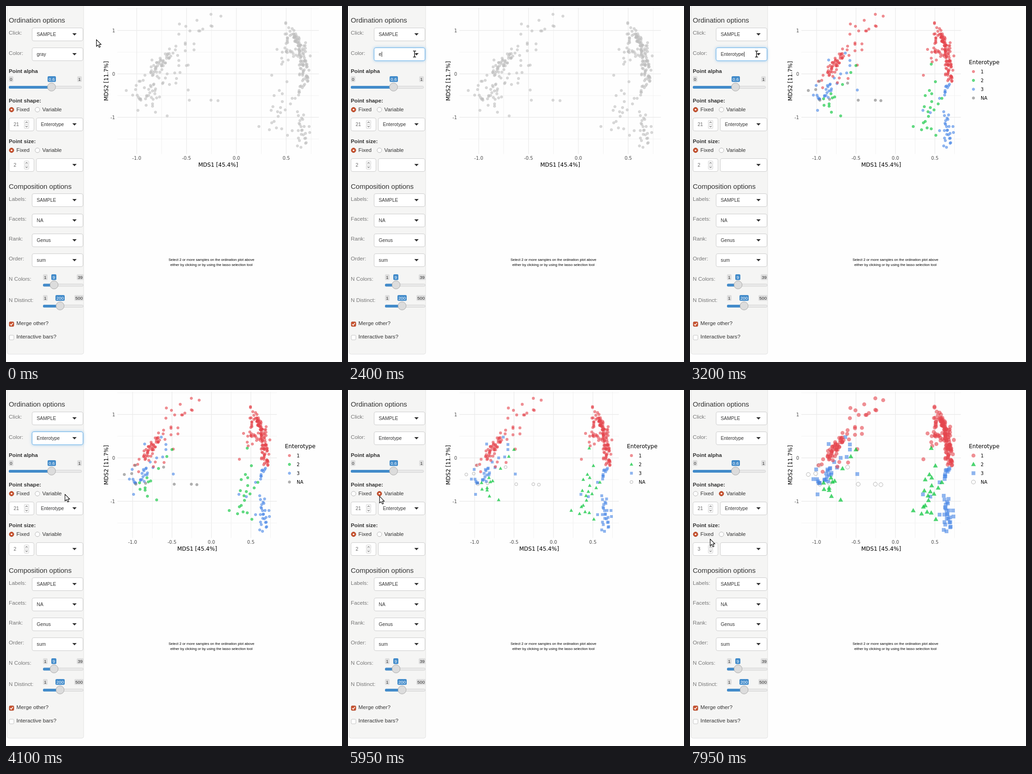
Animation, 727 px wide and 771 px high, one loop 8 s. Source, as an HTML page:

```html
<!DOCTYPE html>
<html lang="en">
<head>
<meta charset="utf-8">
<title>Ordination explorer</title>
<style>
html, body { margin: 0; width: 100%; height: 100%; overflow: hidden; background: #fefefe; }
svg { display: block; width: 100vw; height: 100vh; font-family: "Liberation Sans", Arial, sans-serif; }
.plot { font-family: "DejaVu Sans", Verdana, sans-serif; }
</style>
</head>
<body>
<svg id="stage" viewBox="0 0 727 771"></svg>
<script>
const LOOP = 8000, STEP = 50;
const stage = document.getElementById('stage');
const $ = id => document.getElementById(id);

// ---------- markup helpers ----------
const rect = (x, y, w, h, fill, more = '') =>
  `<rect x="${x}" y="${y}" width="${w}" height="${h}" fill="${fill}" ${more}/>`;
const text = (x, y, s, size = 11.7, fill = '#333', more = '') =>
  `<text x="${x}" y="${y}" font-size="${size}" fill="${fill}" ${more}>${s}</text>`;
const line = (x1, y1, x2, y2, w) =>
  `<path d="M${x1} ${y1}L${x2} ${y2}" stroke="#ebebeb" stroke-width="${w}"/>`;
const mid = 'text-anchor="middle"';
const bold = 'font-weight="bold"';

// ---------- sidebar ----------
const field = (x, y, w, id = '') =>
  rect(x + .5, y + .5, w - 1, 28, '#fff', `rx="3.5" stroke="#ccc" ${id && `id="${id}"`}`);

const select = (x, y, value, id) => field(x, y, 167 - x, id && id + 'Box') +
  text(x + 10.5, y + 18, value, 10.3, '#333', id ? `id="${id}Text"` : '') +
  `<path ${id ? `id="${id}Arrow"` : ''} d="M143.5 ${y + 12}h9.4l-4.7 5z" fill="#333"/>`;

const number = (y, value, id) => field(6, y, 55) +
  text(16.5, y + 18, value, 10.3, '#666', `id="${id}"`) +
  rect(39.5, y + 5.5, 10, 9, '#f7f7f7', 'rx="2" stroke="#ccc" stroke-width=".8"') +
  rect(39.5, y + 14.5, 10, 9, '#f7f7f7', 'rx="2" stroke="#ccc" stroke-width=".8"') +
  `<path d="M42.3 ${y + 11.2}l2.2-2.4 2.2 2.4M42.3 ${y + 17.8}l2.2 2.4 2.2-2.4" fill="none" stroke="#333"/>`;

const badge = (x, y, w, s, active) =>
  rect(x, y, w, 12.5, active ? '#428bca' : '#dedede', 'rx="2.5"') +
  text(x + w / 2, y + 9.7, s, 9.6, active ? '#fff' : '#333', mid);

const slider = (x, y, end, knob) =>
  rect(x + .5, y - 2.5, end - x - 1, 5, '#eaeaea', 'rx="2.5" stroke="#d2d2d2"') +
  rect(x, y - 3, knob - x, 6, '#428bca', 'rx="2.5"') +
  `<circle cx="${knob}" cy="${y - .5}" r="8.8" fill="#dcdcdc" stroke="#aaa"/>`;

const radio = (x, y, label, id) =>
  `<g id="${id}"><circle cx="${x}" cy="${y}" r="5"/><circle cx="${x}" cy="${y}" r="1.8" fill="#fff"/></g>` +
  text(x + 10.5, y + 3.5, label);

function setRadio(id, on) {
  const dot = $(id).firstChild;
  dot.setAttribute('fill', on ? '#c8522f' : '#fff');
  dot.setAttribute('stroke', on ? '#a84224' : '#b5b5b5');
}

const label = (y, s) => text(6, y, s, 11.7, '#777');

const sidebar = rect(2.5, -10, 165.5, 764, '#f5f5f4', 'rx="4" stroke="#e1e1e1"') +
  text(6, 36, 'Ordination options', 15) +
  label(62, 'Click:') + select(56, 47, 'SAMPLE') +
  label(106, 'Color:') + select(56, 90, 'gray', 'color') +
  text(6, 145, 'Point alpha', 11.7, '#333', bold) +
  slider(6, 176, 164, 98.5) +
  badge(6, 152, 10, '0') + badge(90, 152, 18, '0.6', true) + badge(154, 152, 10, '1') +
  text(6, 209, 'Point shape:', 11.7, '#333', bold) +
  radio(12, 224.5, 'Fixed', 'shapeFixed') + radio(68, 224.5, 'Variable', 'shapeVar') +
  number(242, '21', 'shapeNum') + select(65, 242, 'Enterotype') +
  text(6, 297, 'Point size:', 11.7, '#333', bold) +
  radio(12, 312.5, 'Fixed', 'sizeFixed') + radio(68, 312.5, 'Variable', 'sizeVar') +
  number(330, '2', 'sizeNum') + select(65, 330, '') +
  text(6, 396, 'Composition options', 15) +
  label(422, 'Labels:') + select(56, 406, 'SAMPLE') +
  label(465, 'Facets:') + select(56, 450, 'NA') +
  label(508, 'Rank:') + select(56, 493, 'Genus') +
  label(551, 'Order:') + select(56, 536, 'sum') +
  label(595, 'N Colors:') + slider(80, 604.5, 167.5, 104) +
  badge(80, 581, 10, '1') + badge(98, 581, 11, '9', true) + badge(153, 581, 15, '39') +
  label(640.5, 'N Distinct:') + slider(80, 650, 167.5, 117) +
  badge(80, 626, 10, '1') + badge(107, 626, 20, '200', true) + badge(148, 626, 20, '500') +
  rect(7, 684, 10, 10, '#c8522f', 'rx="2" stroke="#a84224" stroke-width=".8"') +
  '<path d="M9 689l2.2 2.4L15 686.5" fill="none" stroke="#fff" stroke-width="1.6"/>' +
  text(22.5, 691, 'Merge other?') +
  rect(7, 713, 10, 10, '#fff', 'rx="2" stroke="#b5b5b5" stroke-width=".8"') +
  text(22.5, 720, 'Interactive bars?');

// ---------- search results ----------
const options = [['Enterotype', 158], ['magenta', 216], ['magenta2', 237], ['magenta3', 258.5], ['darkmagenta', 280]];
const menu = '<g id="menu">' +
  rect(56.5, 121.5, 110.5, 166, '#fff', 'stroke="#d0d0d0" rx="2" style="filter:drop-shadow(0 4px 5px rgba(0,0,0,.2))"') +
  rect(57, 144, 110, 21, '#f5f5f5') + rect(57, 172, 110, 1, '#e3e3e3') +
  text(67.5, 137.5, 'Variable', 10, '#777') + text(67.5, 194, 'Fixed', 10, '#777') +
  '<g id="marks" fill="#ffed28" fill-opacity=".45"></g>' +
  options.map(([s, y]) => text(67.5, y, s, 11.6, '#333', 'class="option"')).join('') + '</g>';

// ---------- data, in pixels of the coloured panel ----------
let seed = 11;
function rand() {
  seed = (seed + 0x6D2B79F5) | 0;
  let r = Math.imul(seed ^ seed >>> 15, 1 | seed);
  r = r + Math.imul(r ^ r >>> 7, 61 | r) ^ r;
  return ((r ^ r >>> 14) >>> 0) / 4294967296;
}
const pairs = a => a.flatMap((v, i) => i % 2 ? [] : [[v, a[i + 1]]]);
// points scattered around a segment
const cloud = (n, x0, y0, x1, y1, sx, sy = 3) => Array.from({ length: n }, (_, i) => {
  const k = (i + .5) / n, soft = () => rand() + rand() + rand() - 1.5;
  return [x0 + (x1 - x0) * k + soft() * 1.6 * sx, y0 + (y1 - y0) * k + soft() * 1.6 * sy];
});

const groups = [
  { name: '3', color: '#4785e6', shape: 'square', pts: [
    ...pairs([300, 117, 346, 118, 346, 129, 339, 145, 326, 147, 312, 156, 336, 102, 273, 172, 267, 193,
      276, 226, 362, 182, 291, 194, 299, 198, 318, 168, 504, 226, 520, 231, 540, 200, 540, 270, 549, 229,
      569, 261, 570, 274, 564, 296, 555, 306, 549, 303]),
    ...cloud(11, 301, 167, 298, 195, 7), ...cloud(5, 275, 194, 283, 204, 2),
    ...cloud(9, 558, 165, 553, 191, 4), ...cloud(20, 555, 236, 560, 298, 6)] },
  { name: '1', color: '#e5454c', shape: 'circle', pts: [
    ...pairs([401, 18, 418, 22, 377, 31, 347, 39, 358, 44, 401, 43, 403, 44, 365, 54, 380, 54, 382, 54,
      387, 50, 346, 61, 357, 80, 357, 83, 372, 82, 372, 95, 357, 97, 341, 87, 340, 95, 330, 93, 344, 107,
      362, 128, 342, 157, 288, 150, 278, 163, 285, 161, 287, 177, 323, 156, 319, 166, 529, 36, 529, 38,
      534, 47, 540, 49, 543, 53, 514, 94, 505, 150, 522, 113, 524, 121, 567, 156]),
    ...cloud(44, 302, 148, 328, 108, 7, 5), ...cloud(10, 534, 54, 533, 84, 3),
    ...cloud(12, 526, 93, 541, 110, 6, 6), ...cloud(32, 543, 58, 553, 88, 3),
    ...cloud(46, 553, 84, 562, 132, 7), ...cloud(24, 557, 128, 562, 166, 5)] },
  { name: '2', color: '#00c334', shape: 'triangle', pts: pairs([
    359, 129, 348, 144, 330, 170, 326, 238, 306, 230, 301, 217, 301, 212, 289, 201, 290, 215, 305, 190,
    308, 199, 313, 197, 522, 126, 531, 164, 518, 183, 509, 194, 523, 190, 523, 207, 537, 212, 545, 200,
    507, 218, 515, 229, 520, 220, 528, 225, 516, 239, 509, 250, 505, 253, 501, 268, 513, 264, 522, 266,
    532, 280, 483, 261]) },
  { name: 'NA', color: '#7f7f7f', shape: 'ring', pts: pairs([
    256, 183, 272, 181, 341, 167, 364, 204, 401, 204, 413, 205, 280, 163, 281, 204, 302, 202]) }
];

// ---------- plot ----------
function mark(shape, x, y, r, color) {
  const fill = `fill="${color}" fill-opacity=".6"`;
  const at = `cx="${x.toFixed(1)}" cy="${y.toFixed(1)}"`;
  if (shape === 'square') return rect(x - r * .95, y - r * .95, r * 1.9, r * 1.9, color, 'fill-opacity=".6"');
  if (shape === 'triangle')
    return `<path d="M${x} ${y - r * 1.3}l${r * 1.2} ${r * 2.15}h${-r * 2.4}z" fill="${color}" fill-opacity=".7"/>`;
  if (shape === 'ring')
    return `<circle ${at} r="${r}" fill="none" stroke="${color}" stroke-opacity=".65" stroke-width=".9"/>`;
  if (shape === 'dot')
    return `<circle ${at} r="${r - .4}" ${fill} stroke="${color}" stroke-opacity=".45" stroke-width=".9"/>`;
  return `<circle ${at} r="${r}" ${fill}/>`;
}

function drawPlot(colored, shaped, size) {
  const zero = colored ? 444.5 : 498.5, unit = colored ? 170.6 : 215.7, right = colored ? 586 : 677;
  const r = 3.2 + (size - 2) * 1.1;
  let out = '';
  for (const y of [6, 100, 194, 288]) out += line(241, y, right, y, .7);
  for (const v of [-.75, -.25, .25, .75]) out += line(zero + v * unit, 4, zero + v * unit, 320.5, .7);
  for (const v of [1, 0, -1]) {
    const y = 147 - v * 94;
    out += line(241, y, right, y, 1.3) + text(236, y + 3.8, v, 10, '#4d4d4d', 'text-anchor="end"');
  }
  for (const v of [-1, -.5, 0, .5]) {
    const x = zero + v * unit;
    out += line(x, 4, x, 320.5, 1.3) + text(x, 333, v.toFixed(1), 10, '#4d4d4d', mid);
  }
  out += text((241 + right) / 2, 347.5, 'MDS1 [45.4%]', 12, '#000', mid) +
    text(0, 0, 'MDS2 [11.7%]', 12, '#000', mid + ' transform="translate(221 162.5) rotate(-90)"');
  for (const g of groups)
    for (const [x, y] of g.pts)
      out += mark(shaped ? g.shape : 'dot', zero + (x - 444.5) / 170.6 * unit, y, r, colored ? g.color : '#bebebe');
  if (colored) {
    out += text(603.5, 125.5, 'Enterotype', 12, '#000');
    ['1', '2', '3', 'NA'].forEach((name, i) => {
      const g = groups.find(g => g.name === name), y = 142 + i * 19.1;
      out += mark(shaped ? g.shape : 'dot', 613.3, y, r, g.color) + text(629, y + 3.8, name, 10, '#000');
    });
  }
  $('plot').innerHTML = out;
}

// ---------- pointer ----------
const outline = 'fill="#fff" stroke="#111" stroke-width="1.2" stroke-linejoin="round"';
const pointers = {
  arrow: `<path d="M.6 .8V15.5L4 12.4L6.5 17.6L9 16.5L6.6 11.4H11Z" ${outline}/>`,
  hand: `<path d="M-1.4 8V1.3a1.4 1.4 0 0 1 2.8 0V5.6c.3-1 2.3-1 2.5 .3c.5-.8 2.2-.7 2.4 .5c.6-.7 2.2-.4 2.2 .9V10.5c0 1.8-1.2 2-1.2 3.2H.2c-.8-1.9-4-4.2-4.3-5.6c0-1.6 1.7-1.3 2.7 0z" ${outline}/>`,
  beam: ['#fff" stroke-width="3.4', '#111" stroke-width="1.5'].map(s =>
    `<path d="M-3.2-6.5h2.4L0-6l.8-.5h2.4M0-6V6M-3.2 6.5h2.4L0 6l.8 .5h2.4" fill="none" stroke="${s}"/>`).join('')
};
// time, x, y
const route = [
  [200, 195, 72], [1050, 141, 106], [1150, 141, 106], [1200, 144, 109], [2000, 144, 109], [2050, 144, 104],
  [3900, 144, 104], [4000, 148, 165], [4100, 127, 225], [4300, 115, 256],
  [4450, 115, 256], [4900, 68, 228], [5900, 68, 228], [6650, 43, 337], [7850, 43, 337], [7950, 43, 322]
];
function pointerAt(t) {
  const i = route.findIndex(p => p[0] > t);
  if (i < 0) return route[route.length - 1].slice(1);
  if (i === 0) return route[0].slice(1);
  const [t0, x0, y0] = route[i - 1], [t1, x1, y1] = route[i];
  let k = (t - t0) / (t1 - t0);
  if (t1 - t0 > 300) k = k * k * (3 - 2 * k);
  return [x0 + (x1 - x0) * k, y0 + (y1 - y0) * k];
}
function pointerKind(t, x, y) {
  if (t >= 1200 && t < 3950) return 'beam';
  const overColor = t < 1200 && x < 167 && y > 90, overShape = x > 65 && y > 242 && y < 270;
  return overColor || overShape ? 'hand' : 'arrow';
}

// ---------- scene ----------
stage.innerHTML = '<g id="plot" class="plot"></g>' +
  text(444.5, 552, 'Select 2 or more samples on the ordination plot above', 7.75, '#000', mid) +
  text(444.5, 563, 'either by clicking or by using the lasso selection tool', 7.75, '#000', mid) +
  sidebar + menu + rect(0, 99, 1, 11, '#222', 'id="caret"') + '<g id="pointer"></g>';

document.querySelectorAll('.option').forEach((el, i) => {
  const s = el.textContent, from = s.toLowerCase().indexOf('ent');
  const x = 67.5 + (from ? el.getSubStringLength(0, from) : 0);
  $('marks').innerHTML += rect(x, options[i][1] - 10, el.getSubStringLength(from, 3), 12.5, '#ffed28');
});
setRadio('sizeFixed', true);
setRadio('sizeVar', false);

// latest value whose start time has passed
const at = (t, ...steps) => steps.filter(s => s[0] <= t).pop()[1];
const show = (id, on) => $(id).setAttribute('visibility', on ? 'visible' : 'hidden');
let plotKey = '', pointerNow = '';

function update(t) {
  const colored = t >= 3200, shaped = t >= 5250, size = at(t, [0, 2], [7100, 2.5], [7500, 3]);
  const key = [colored, shaped, size].join();
  if (key !== plotKey) drawPlot(colored, shaped, size);
  plotKey = key;

  const focus = t >= 1200 && t < 5050, open = t >= 2700 && t < 3150;
  const typed = at(t, [0, 'gray'], [1800, ''], [2400, 'e'], [2500, 'en'], [2600, 'ent'], [3150, 'Enterotype']);
  const caret = at(t, [0, 0], [1900, 1], [3000, 0], [3150, 1], [3750, 0], [4250, 1], [4750, 0]);
  $('colorText').textContent = typed;
  $('colorBox').setAttribute('stroke', focus ? '#66afe9' : '#ccc');
  $('colorBox').style.filter = focus ? 'drop-shadow(0 0 3px rgba(102,175,233,.65))' : 'none';
  $('colorArrow').setAttribute('d', open ? 'M143.5 106.5h9.4l-4.7-5z' : 'M143.5 102h9.4l-4.7 5z');
  $('caret').setAttribute('x', 67 + (typed ? $('colorText').getComputedTextLength() : 0));
  show('caret', caret);
  show('menu', open);

  setRadio('shapeFixed', t < 5050);
  setRadio('shapeVar', t >= 5050);
  $('sizeNum').textContent = at(t, [0, '2'], [6950, '2.5'], [7350, '3']);

  const [x, y] = pointerAt(t), kind = pointerKind(t, x, y);
  if (kind !== pointerNow) $('pointer').innerHTML = pointers[kind];
  pointerNow = kind;
  $('pointer').setAttribute('transform', `translate(${x.toFixed(1)} ${y.toFixed(1)})`);
}

const start = performance.now();
function tick(now) {
  const t = Math.max(0, now - start) % LOOP;
  update(Math.floor(t / STEP) * STEP);
  requestAnimationFrame(tick);
}
update(0);
requestAnimationFrame(tick);
</script>
</body>
</html>
```
